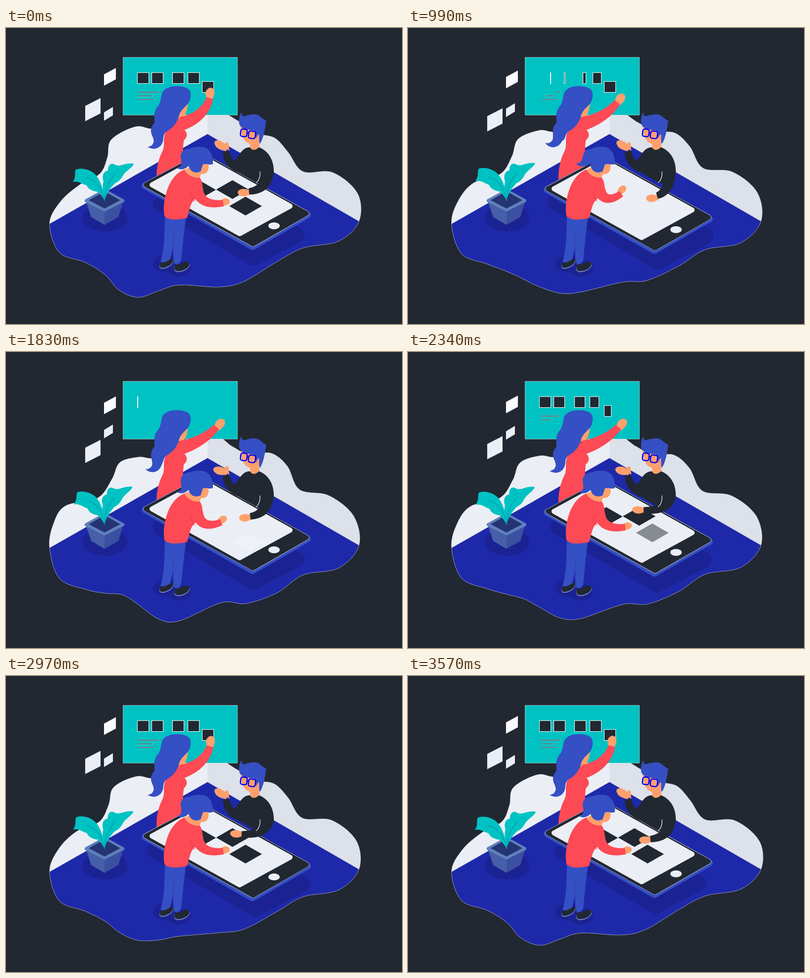
These frames come from a looping animation (800 px wide and 600 px high, 3600 ms). An HTML page:

```html
<!DOCTYPE html>
<html lang="en">
<head>
<meta charset="utf-8">
<title>Team building a page</title>
<style>
  html, body { margin: 0; width: 100%; height: 100%; overflow: hidden; background: #222831; }
  svg { display: block; }
  .ink { fill: #222831; }
  .teal { fill: #00c2c3; }
  .pale { fill: #ebeef4; }
  .shade { fill: #1b2394; }
  .hair { fill: #354fc4; }
  .skin { fill: #ffa06c; }
  .red { fill: #fd4a55; }
  .line { fill: none; }
  .round { stroke-linejoin: round; }
</style>
</head>
<body>
<svg width="800" height="600" viewBox="0 0 800 600">
  <defs>
    <clipPath id="roomClip"><path id="room"/></clipPath>
    <clipPath id="screenClip"><path d="M288,318L397,257L580,361L472,424Z"/></clipPath>
    <path id="hand" d="M-6,12C-10,2 -10,-5 -5,-9C0,-15 9,-12 9,-2C9,4 6,8 5,13Z"/>
  </defs>

  <g clip-path="url(#roomClip)">
    <path class="pale" d="M60,100H407V600H60Z"/>
    <path fill="#dde1e9" d="M407,100H740V600H407Z"/>
    <path fill="#1e29aa" d="M407,215L760,419V600H40V424.500Z"/>
  </g>
  <use href="#room" class="line" stroke="#fff" stroke-width=".8" stroke-opacity=".5"/>

  <path id="cardA" fill="#fbfbff" d="M198,94L222,81V104L198,117Z"/>
  <path id="cardB" class="pale" d="M160,158L191,142V173L160,189Z"/>
  <path id="cardC" class="pale" d="M198,171L216,160V177L198,188Z"/>

  <path class="teal" stroke="#fff" stroke-opacity=".5" d="M236.500,59.500H467.500V176.500H236.500Z"/>
  <g id="bars" class="ink" stroke="#fff" shape-rendering="crispEdges"></g>

  <!-- plant -->
  <ellipse class="shade" cx="200" cy="385" rx="46" ry="28"/>
  <path fill="#465fa8" d="M161,350L199,370V399L172,383Z"/>
  <path fill="#3b50a0" d="M199,370L237,350L227,383L199,399Z"/>
  <path fill="#5f80bd" d="M159,348L199,326L239,348V352L199,372L159,352Z"/>
  <path fill="#243472" d="M167,349L199,331L231,349L199,366Z"/>
  <g class="teal" stroke-width="1.300">
    <g id="leafL">
      <path d="M199,350C198,330 192,312 183,300C174,288 155,282 141,287C137,295 143,300 135,312C148,310 152,316 163,319C166,326 172,330 185,332C192,338 196,344 199,350Z"/>
      <path class="line" stroke="#009aa6" d="M161,303Q190,308 199,350"/>
    </g>
    <g id="leafR">
      <path d="M199,350C196,335 194,320 197,311C193,300 197,290 206,289C206,278 212,272 220,277C230,283 240,272 258,275C258,281 242,290 237,298C232,308 226,312 220,315C210,325 203,335 199,350Z"/>
      <path class="line" stroke="#009aa6" d="M221,296Q200,316 199,350"/>
    </g>
  </g>

  <!-- woman at the board -->
  <path class="skin" d="M368,148C367,165 363,176 358,180L345,183L350,158Z"/>
  <path class="red" d="M347,180C335,185 330,200 322,212C316,225 322,238 316,250C308,265 304,285 304,302V316L356,290L359,258C356,245 359,235 359,228C366,222 368,215 361,207L358,192Z"/>
  <use id="boardHand" href="#hand" class="skin"/>
  <path id="boardArm" class="red"/>
  <g class="hair">
    <path id="lock" d="M294,205C291,214 301,226 298,232C296,238 292,240 286,241C303,251 318,240 318,222L316,205Z"/>
    <path d="M316,130C325,116 350,115 366,122C376,128 374,140 370,150C364,160 352,165 349,180C346,190 338,203 324,210C318,214 319,222 314,228L298,222C290,212 292,200 300,192C300,182 298,172 304,162C314,153 312,140 316,130Z"/>
  </g>

  <!-- phone -->
  <path id="phoneShade" class="shade round" stroke="#1b2394" stroke-width="30" d="M312,357L395,312L588,420L500,467Z"/>
  <g id="phone" class="round">
    <path fill="#354fc4" stroke="#354fc4" stroke-width="14" d="M281,320L395,260L609,379L498,443Z"/>
    <path fill="#fff" stroke="#fff" stroke-width="11" d="M283,318L395,258L607,376L499,438Z"/>
    <path class="ink" stroke="#222831" stroke-width="10" d="M283,318L395,258L607,376L499,438Z"/>
    <path class="pale" stroke="#ebeef4" stroke-width="10" d="M295,318L397,262L574,361L472,417Z"/>
    <ellipse class="pale" cx="541.500" cy="401" rx="11.500" ry="7"/>
  </g>
  <g id="tiles" clip-path="url(#screenClip)"></g>

  <!-- man -->
  <use id="openHand" href="#hand" class="skin"/>
  <path class="skin" d="M441,242L444,232Q449,230 450,236L451,249Z"/>
  <path class="ink" d="M490,242C478,243 470,258 463,268C459,270 455,262 450,248L438,252C439,270 447,285 470,293L505,313C525,318 541,310 541,290C541,262 525,246 509,241Z"/>
  <use id="dragHand" href="#hand" class="skin"/>
  <path id="dragArm" class="ink"/>
  <path class="line" stroke="#fff" stroke-width="1.200" d="M513,291C514,303 510,310 505,314"/>
  <path class="skin" d="M474,198L476,215C480,228 486,233 493,235L493,242C497,250 507,248 512,240L511,228L516,214L508,200Z"/>
  <path class="hair" d="M471,193C470,186 472,178 475,171C476,176 478,179 481,179C492,175 502,174 508,176C515,179 516,183 526,188L525,192C523,205 521,222 513,235C510,230 512,224 511,215C508,216 507,220 506,225C505,215 505,207 497,207C487,207 473,204 471,193Z"/>
  <g class="line" stroke="#0000f5" stroke-width="2.500">
    <rect x="474" y="205" width="13" height="15" rx="4" transform="rotate(7 480 212)"/>
    <rect x="490" y="209" width="14" height="15" rx="4" transform="rotate(7 497 216)"/>
    <path d="M486,212L490,213"/>
  </g>

  <!-- woman at the phone -->
  <ellipse class="shade" cx="326" cy="478" rx="29" ry="18"/>
  <ellipse class="shade" cx="349" cy="487" rx="25" ry="17"/>
  <g fill="#4a66b5" stroke="#fff" stroke-width=".5" transform="translate(0 1.500)">
    <path id="shoeL" d="M311,484C309,478 314,473 318,475C323,476 330,466 336,468C340,474 334,481 322,485C317,487 312,486 311,484Z"/>
    <path id="shoeR" d="M341,490C339,482 343,477 348,479C355,480 360,471 368,474C374,478 370,485 360,490C350,494 343,493 341,490Z"/>
  </g>
  <g class="ink" stroke="none"><use href="#shoeL"/><use href="#shoeR"/></g>
  <path class="hair" d="M321,380L342,384L338,440L332,468C325,475 318,476 312,474C320,450 320,420 321,380Z"/>
  <path class="hair" d="M338,384L364,380C360,410 358,430 354,471C350,480 343,481 339,476C336,450 339,420 338,384Z"/>
  <path class="line" stroke="#2a41a8" d="M340,418L337,440"/>
  <path class="skin" d="M390,270L409,276C411,290 405,297 394,296L391,304C375,307 359,300 358,288L372,282Z"/>
  <use id="swipeHand" href="#hand" class="skin"/>
  <path class="red" d="M360,287C340,295 330,315 325,330C318,350 318,370 320,381C330,392 352,388 366,385C370,370 373,355 379,350L398,330C397,315 395,306 391,303C380,305 367,299 360,287Z"/>
  <path id="swipeArm" class="red"/>
  <path class="line" stroke="#d93c4a" d="M374,332C375,341 378,347 382,352"/>
  <g class="hair">
    <path id="bun" d="M380,244C362,242 352,250 353,262C355,274 356,281 346,284C354,289 364,286 372,276L380,262Z"/>
    <path d="M366,248C374,241 385,240 397,241C410,243 419,255 418,276L411,277C407,275 402,276 398,276L393,291C380,296 372,290 369,280Z"/>
  </g>
</svg>

<script>
const LOOP = 3600, NS = 'http://www.w3.org/2000/svg';
const $ = id => document.getElementById(id);
const clamp = v => Math.max(0, Math.min(1, v));
const lerp = (a, b, k) => a + (b - a) * k;
const mix = (a, b, k) => a.map((v, i) => lerp(v, b[i], k));
const wave = (t, period) => Math.sin(Math.PI * t / period) ** 2;
const cubic = u => (u = clamp(u)) < .5 ? 4 * u ** 3 : 1 - (2 - 2 * u) ** 3 / 2;
const smooth = u => (u = clamp(u)) * u * (3 - 2 * u);
const place = (id, transform) => $(id).setAttribute('transform', transform);

// Rises from 0 to 1 between a and b, falls back between c and d (may pass the loop end).
function pulse(t, a, b, c, d) {
  if (t < a) t += LOOP;
  return smooth((t - a) / (b - a)) - smooth((t - c) / (d - c));
}

// Closed smooth curve through key points.
function spline(p) {
  const n = p.length, at = i => p[(i + n) % n];
  const handle = (i, s) => at(i).map((v, j) => v + s * (at(i + 1)[j] - at(i - 1)[j]) / 6);
  return `M${p[0]}` + p.map((_, i) => `C${handle(i, 1)} ${handle(i + 1, -1)} ${at(i + 1)}`).join('') + 'Z';
}

// Tapered sleeve bent from shoulder over elbow to wrist.
function limb(id, shoulder, elbow, wrist, wide, narrow) {
  const left = [], right = [];
  for (let u = 0; u <= 1.001; u += .1) {
    const a = mix(shoulder, elbow, u), b = mix(elbow, wrist, u), [x, y] = mix(a, b, u);
    const dx = b[0] - a[0], dy = b[1] - a[1], r = lerp(wide, narrow, u) / 2 / Math.hypot(dx, dy);
    left.push([x + dy * r, y - dx * r]);
    right.unshift([x - dy * r, y + dx * r]);
  }
  $(id).setAttribute('d', 'M' + left.concat(right).join('L') + 'Z');
}

// Pose: x, y, angle
function hand(id, from, to, k, sx, sy) {
  const [x, y, angle] = mix(from, to, k);
  place(id, `translate(${x} ${y}) rotate(${angle}) scale(${sx} ${sy})`);
}

const points = text => text.split(' ').map(pair => pair.split(',').map(Number));
const roomStart = points('88,397 110,352 150,317 190,295 205,262 213,226 262,200 310,203 400,160 472,190 505,213 543,223 570,252 600,291 660,293 710,335 713,392 672,432 600,446 545,475 480,514 430,525 350,521 308,533 267,546 228,531 200,500 160,475 108,455');
const roomEnd = points('88,397 96,348 120,312 185,296 214,258 230,224 268,213 310,212 400,160 458,192 490,208 535,205 568,231 593,279 652,291 702,332 713,392 672,438 600,452 548,488 485,510 435,508 350,545 308,541 262,508 235,492 200,489 160,481 108,459');

function add(parent, tag, attrs) {
  const el = document.createElementNS(NS, tag);
  for (const name in attrs) el.setAttribute(name, attrs[name]);
  return $(parent).appendChild(el);
}

const squares = [266, 295, 337, 368, 397].map((x, i) => ({
  x: x - .5, w: 23, out: 374 + 24 * i * (i + 1), back: 1646 + 65 * i,
  el: add('bars', 'rect', { y: i < 4 ? 90.5 : 108.5, height: 22 })
}));
const textLines = [41, 29, 33].map((w, i) => ({
  x: 267, w, out: 494 + 148 * i, back: 1724 + 115 * i * i,
  el: add('bars', 'rect', { y: 129 + 7.5 * i, height: 1.5, 'stroke-width': .4 })
}));
const tiles = [[391, 328], [457.5, 327.5], [484, 361]].map(([x, y], i) => ({
  x, y, fade: 1750 + 75 * i, el: add('tiles', 'path', { d: 'M-33,0L0,-19L33,0L0,19Z' })
}));

// Bars wipe out to the right, then wipe in from the left.
function drawBar({ x, w, out, back, el }, t) {
  const leaving = t < 1640;
  const width = w * (leaving ? 1 - cubic((t - out) / 800) : cubic((t - back) / 800));
  el.setAttribute('x', leaving ? x + w - width : x);
  el.setAttribute('width', width);
  el.style.display = width < .4 ? 'none' : '';
}

// Tiles are translucent white while fading and switch to dark once solid.
function drawTile({ x, y, fade, el }, t) {
  const leaving = t < 1500;
  const shift = leaving ? -56 * cubic((t - 60) / 600) : 100 * (1 - cubic((t - 1700) / 900));
  const alpha = clamp(leaving ? 1 - (t - 80) / 600 : (t - fade) / 450);
  const solid = alpha > .95;
  el.setAttribute('transform', `translate(${x + shift} ${y + shift * .59})`);
  el.setAttribute('fill', alpha === 1 ? '#222831' : solid ? '#878c93' : '#fff');
  el.setAttribute('fill-opacity', solid ? 1 : alpha * .85);
}

function draw(t) {
  const drift = wave(t, LOOP), float = wave(t, LOOP / 2);
  $('room').setAttribute('d', spline(roomStart.map((p, i) => mix(p, roomEnd[i], drift))));
  place('cardA', `translate(0 ${9 * drift})`);
  place('cardB', `translate(0 ${36 * drift})`);
  place('cardC', `translate(0 ${-13 * drift})`);
  place('leafL', `rotate(${3 * drift} 199 350)`);
  place('leafR', `rotate(${-2 * drift} 199 350)`);
  place('phone', `translate(0 ${8 * float})`);
  place('phoneShade', `translate(449 402) scale(${1 + .1 * float}) translate(-449 -402)`);

  place('lock', `rotate(${18 * pulse(t, 560, 1000, 1350, 2280)} 306 208)`);
  place('bun', `rotate(${22 * pulse(t, 60, 480, 1150, 1800)} 368 262)`);

  const reach = pulse(t, 600, 1130, 2400, 3060);
  limb('boardArm', [354, 194], [400, 181], mix([412, 142], [425, 152], reach), 28, 14);
  hand('boardHand', [412, 133, 0], [432, 146, 30], reach, 1, 1);

  const swipe = pulse(t, 60, 480, 1450, 2230);
  limb('swipeArm', [386, 326], mix([392, 362], [396, 360], swipe), mix([439, 355], [431, 336], swipe), 24, 13);
  hand('swipeHand', [442, 353, 65], [432, 328, 35], swipe, .8, .85);

  const drag = pulse(t, 1500, 2320, 3080, 4060);
  limb('dragArm', [528, 288], mix([530, 332], [530, 322], drag), mix([503, 340], [476, 321], drag), 26, 13);
  hand('dragHand', [493, 345, -100], [465, 320, -92], drag, .85, 1);
  hand('openHand', [434, 238, -62], [433, 241, -80], pulse(t, 1100, 1700, 2400, 2900), .9, 1.2);

  squares.concat(textLines).forEach(bar => drawBar(bar, t));
  tiles.forEach(tile => drawTile(tile, t));
}

const begin = performance.now();
function tick() {
  draw((performance.now() - begin) % LOOP);
  requestAnimationFrame(tick);
}
tick();
</script>
</body>
</html>
```
